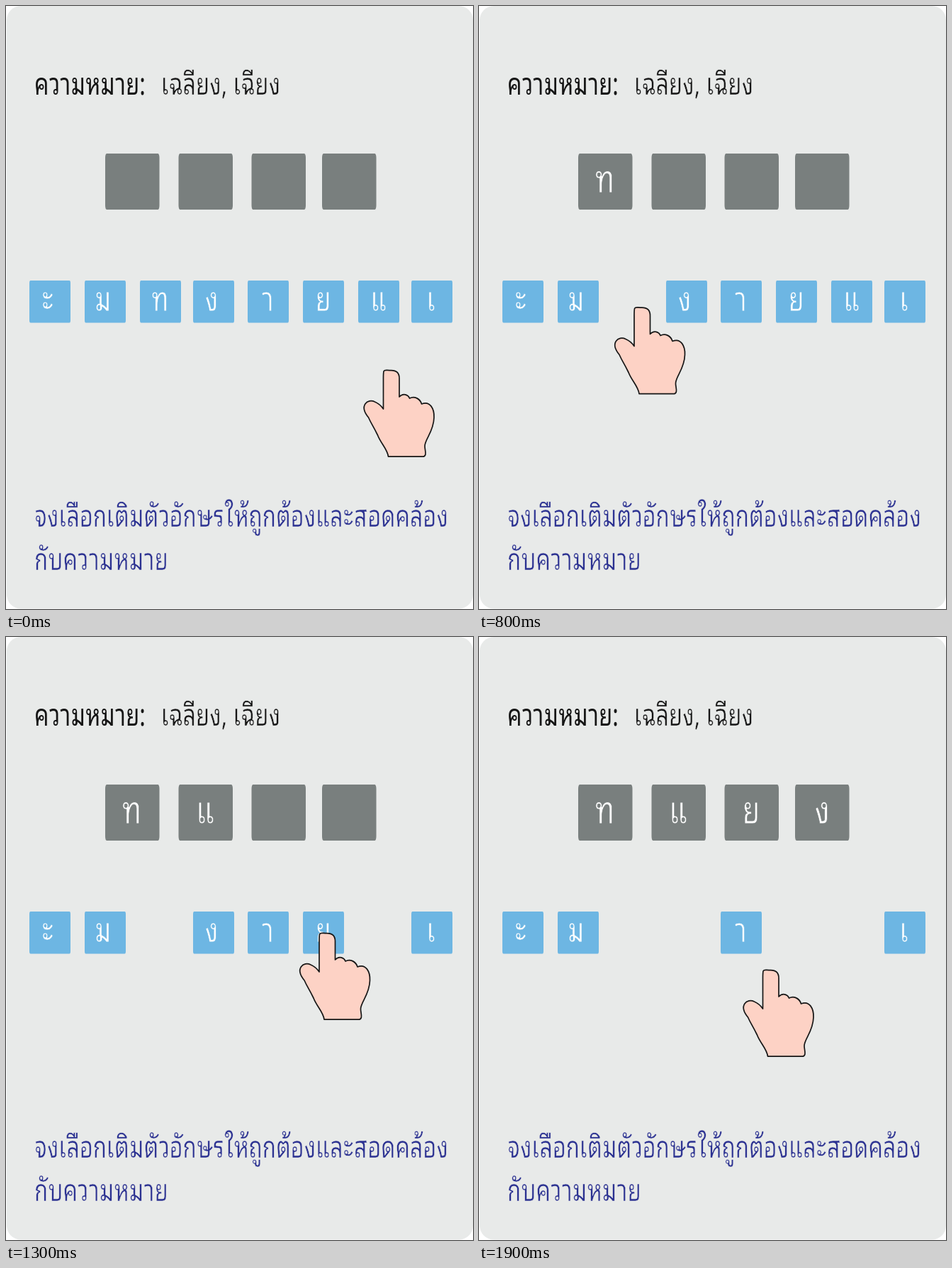
Recreate the animation shown at these times as an HTML page with a canvas. Size 659 by 850 pixels, loop 2.4 s.

```html
<!DOCTYPE html>
<html lang="th">
<head>
<meta charset="utf-8">
<title>เติมตัวอักษร</title>
<style>
html, body { margin: 0; width: 100%; height: 100%; overflow: hidden; background: #fff; }
canvas { display: block; }
</style>
</head>
<body>
<canvas id="stage" width="659" height="850"></canvas>
<script>
const ctx = document.getElementById('stage').getContext('2d');
const LOOP = 2400, STEP = 100;
const INK = '#161616', BLUE = '#2b3191', CARD = '#e8eae9', TILE = '#6db6e3', SLOT = '#797f7e';
const TASK = 'จงเลือกเติมตัวอักษรให้ถูกต้องและสอดคล้อง';
const FACE = '"Noto Looped Thai", "Noto Looped Thai UI", "Noto Sans Thai Looped", ' +
  'Loma, "Noto Serif Thai", "Noto Sans Thai", "Noto Sans", sans-serif';

// letter, tile left edge, letter centre
const tiles = [
  ['ะ', 33, 59], ['ม', 111, 136.5], ['ท', 189, 217], ['ง', 264, 290],
  ['า', 341, 369], ['ย', 419, 447.5], ['แ', 497, 526], ['เ', 572, 600]
];
// slot left edge, letter centre, letter, time the finger lands on its tile
const slots = [
  [140, 177, 'ท', 600], [243.5, 281.5, 'แ', 1000],
  [346.5, 384, 'ย', 1300], [446, 484, 'ง', 1600]
];
// time, fingertip x, y
const stops = [
  [0, 543.5, 513], [500, 411.5, 469], [600, 230, 424.5], [900, 411.5, 469],
  [1000, 530, 424], [1300, 453, 417], [1600, 300, 422], [1900, 411.5, 469]
];
const hand = new Path2D(
  'M-11 55V12C-11-3-11 .7 0 .7C11 .7 11.5 8 11.5 12V38C17 32 24 35 26 40C33 36 41 41 43 48' +
  'C55 43 61 55 60.5 67C60 87 48 97 47.5 107C47 112 52 122 44 122.2H-4' +
  'C-5 112-15 103-19 92C-27 76-27 78-32 67C-46 50-33 40-23 45C-16 48-13 52-11 55Z');

// One size and one narrowing shared by all text
const HEIGHT = 24;
ctx.font = `300 100px ${FACE}`;
const em = 100 * HEIGHT / ctx.measureText('ก').actualBoundingBoxAscent;
const font = `300 ${em}px ${FACE}`;
ctx.font = font;
const narrow = 584 / ctx.measureText(TASK).width;

// Light text has its edge trimmed in the colour of the ground; bold text has not
function text(str, x, y, color, { height = HEIGHT, align = 'left', ground = CARD, bold = false } = {}) {
  const k = height / HEIGHT;
  ctx.save();
  ctx.translate(x, y);
  ctx.scale(k * narrow, k);
  ctx.font = font;
  ctx.textAlign = align;
  ctx.fillStyle = color;
  ctx.fillText(str, 0, 0);
  if (!bold) {
    ctx.strokeStyle = ground;
    ctx.lineWidth = 0.7;
    ctx.lineJoin = 'round';
    ctx.strokeText(str, 0, 0);
  }
  ctx.restore();
}

function box(x, y, w, h, color, radius) {
  ctx.fillStyle = color;
  ctx.beginPath();
  ctx.roundRect(x, y, w, h, radius);
  ctx.fill();
}

function drawHand(x, y) {
  ctx.save();
  ctx.translate(x, y);
  ctx.fillStyle = '#fdd2c5';
  ctx.strokeStyle = INK;
  ctx.lineWidth = 1.7;
  ctx.lineJoin = 'round';
  ctx.fill(hand);
  ctx.stroke(hand);
  ctx.restore();
}

function draw(t) {
  ctx.fillStyle = '#fff';
  ctx.fillRect(0, 0, 659, 850);
  box(1, 0, 658, 849.5, CARD, 20);

  text('ความหมาย:', 40, 125, INK, { bold: true });
  text('เฉลียง, เฉียง', 219, 125, INK);
  text(TASK, 40, 734, BLUE);
  text('กับความหมาย', 40, 795, BLUE);

  // a tile vanishes one step after the touch; its letter lands one step later
  for (const [x, cx, letter, touch] of slots) {
    box(x, 208, 76.5, 79, SLOT, { x: 2, y: 6 });
    if (t >= touch + 2 * STEP) {
      text(letter, cx, 263, '#fff', { height: 31, align: 'center', ground: SLOT });
    }
  }
  for (const [letter, x, cx] of tiles) {
    if (slots.some(s => s[2] === letter && t >= s[3] + STEP)) continue;
    box(x, 387, 58, 59.5, TILE, { x: 1.5, y: 4 });
    text(letter, cx, 430, '#fff', { height: 27, align: 'center', ground: TILE });
  }

  const [, x, y] = stops.filter(s => t >= s[0]).pop();
  drawHand(x, y);
}

const start = performance.now();
function frame() {
  draw((performance.now() - start) % LOOP);
  requestAnimationFrame(frame);
}
frame();
</script>
</body>
</html>
```
